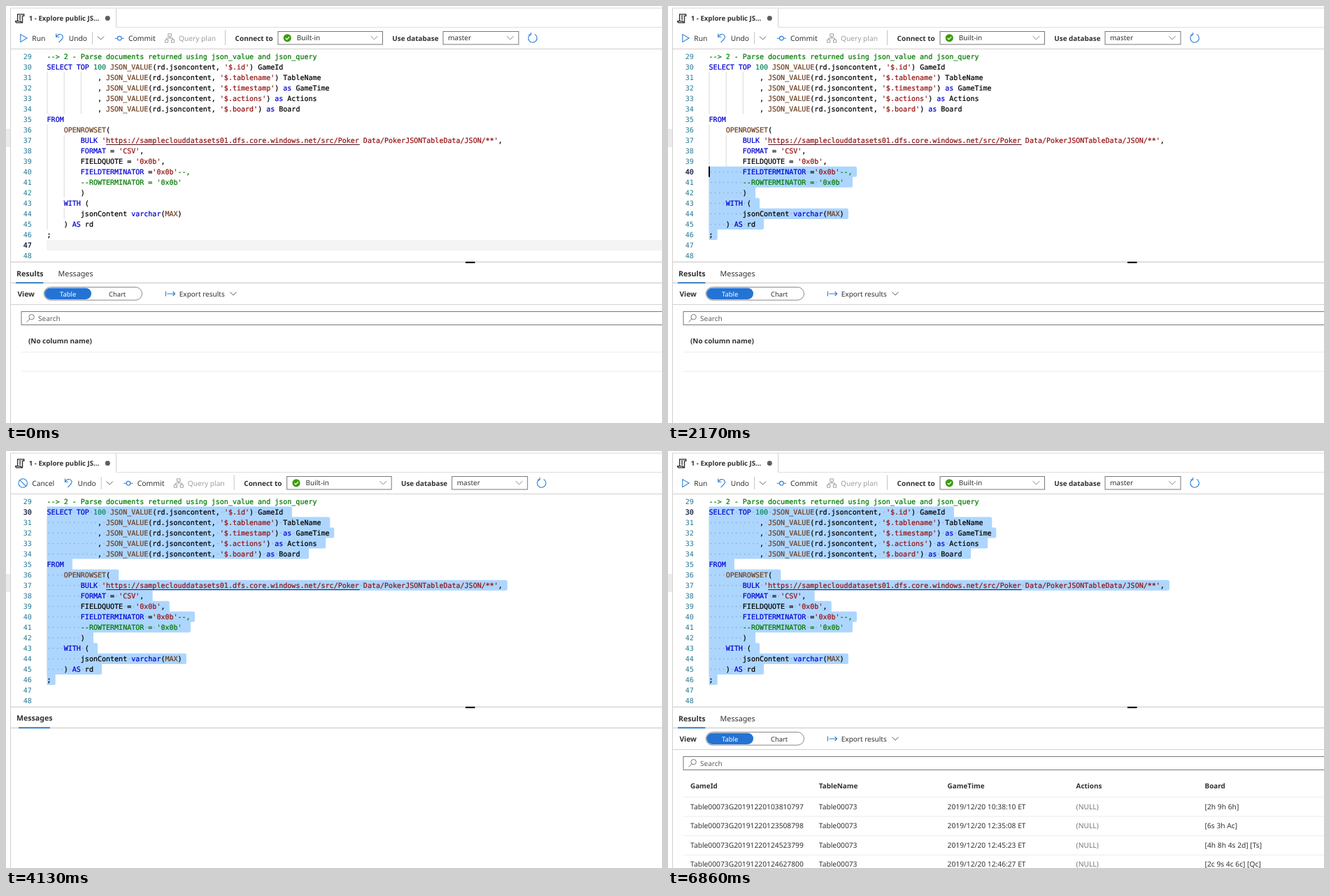
Recreate the animation shown at these times as an HTML page. Size 938 by 597 pixels, loop 7350 ms.

```html
<!DOCTYPE html>
<html lang="en">
<head>
<meta charset="utf-8">
<title>Query editor</title>
<style>
  html, body { margin: 0; width: 100%; height: 100%; overflow: hidden; background: #fff; }
  svg { display: block; width: 100%; height: 100%; }
  text { font: 10.2px "Noto Sans", "Open Sans", sans-serif; fill: #323130; text-rendering: geometricPrecision; }
  .b { font-weight: 600; }
  .code text { font: 10.03px "DejaVu Sans Mono", monospace; color: #000; }
  .code text, .code tspan { fill: currentColor; stroke: currentColor; stroke-width: .22; }
  .code .num { color: #237893; stroke: none; }
  .code .num.on { color: #0b1030; stroke: currentColor; }
  .code .dot { color: #333; stroke: none; opacity: .3; }
  .comment { color: #007a00; }
  .string { color: #941212; }
  .keyword { color: #0000d0; }
  .func { color: #6e3f22; }
  .number { color: #098658; }
  .line { fill: none; stroke-width: 1; }
  .blue { fill: none; stroke: #2b7cd3; stroke-width: 1.1; }
  .gray { fill: none; stroke: #7a7876; stroke-width: 1; }
</style>
</head>
<body>
<svg id="stage" viewBox="0 0 938 597" preserveAspectRatio="none"></svg>
<script>
const LOOP = 7350, STEP = 70;
const X = 58.6, CHAR = 6.04, ROW = 15.03, FIRST = 29;
const NBSP = '\u00a0';

const lines = [
  '--> 2 - Parse documents returned using json_value and json_query',
  "SELECT TOP 100 JSON_VALUE(rd.jsoncontent, '$.id') GameId ",
  "            , JSON_VALUE(rd.jsoncontent, '$.tablename') TableName ",
  "            , JSON_VALUE(rd.jsoncontent, '$.timestamp') as GameTime",
  "            , JSON_VALUE(rd.jsoncontent, '$.actions') as Actions ",
  "            , JSON_VALUE(rd.jsoncontent, '$.board') as Board ",
  'FROM ',
  '    OPENROWSET( ',
  "        BULK 'https://sampleclouddatasets01.dfs.core.windows.net/src/Poker Data/PokerJSONTableData/JSON/**',",
  "        FORMAT = 'CSV', ",
  "        FIELDQUOTE = '0x0b',",
  "        FIELDTERMINATOR ='0x0b'--,",
  "        --ROWTERMINATOR = '0x0b' ",
  '        ) ',
  '    WITH ( ',
  '        jsonContent varchar(MAX)',
  '    ) AS rd ',
  ';',
  '',
  ''
];

const tokens = /(--.*)|('[^']*')|\b(SELECT|TOP|FROM|BULK|FORMAT|FIELDTERMINATOR|WITH|AS|as|varchar)\b|\b(JSON_VALUE|OPENROWSET|MAX)\b|\b(\d+)\b/g;
const kinds = ['comment', 'string', 'keyword', 'func', 'number'];
const paint = s => s.replace(/ /g, NBSP).replace(tokens, (m, ...groups) =>
  `<tspan class="${kinds[groups.findIndex(g => g !== undefined)]}">${m}</tspan>`);
const spaceDots = s => s.trimEnd().replace(/[^ ]/g, NBSP).replace(/ /g, '·');

const rowTop = n => 64.4 + (n - FIRST) * ROW;
const text = (x, y, s, cls = '', size = 10.2, fill = '#323130') =>
  `<text x="${x}" y="${y}" class="${cls}" style="font-size:${size}px;fill:${fill}">${s}</text>`;
const line = (x1, y1, x2, y2, color) =>
  `<path class="line" d="M${x1} ${y1}L${x2} ${y2}" stroke="${color}"/>`;
const chevron = (x, y, r = 4.5, color = '#605e5c') =>
  `<path class="line" d="M${x - r} ${y - r / 2}l${r} ${r}l${r} ${-r}" stroke="${color}"/>`;
const combo = (x, w, label, lx) =>
  `<rect class="gray" x="${x}" y="36.5" width="${w}" height="18.5"/>` +
  text(lx, 49.3, label, '', 10) + chevron(x + w - 12, 45.5, 4.8, '#8a8886');

function codeView() {
  let guides = '', body = '';
  lines.forEach((s, i) => {
    const n = FIRST + i, y = rowTop(n), base = y + 11.1;
    const indent = s.search(/\S|$/);
    for (let c = 0; c < indent; c += 4)
      guides += line(X + c * CHAR + .4, y, X + c * CHAR + .4, y + ROW, '#d8d8d8');
    body += `<text class="num" id="num${n}" x="24.8" y="${base}">${n}</text>` +
      `<text x="${X}" y="${base}">${paint(s)}</text>` +
      `<text class="dot" id="dot${n}" x="${X}" y="${base}">${spaceDots(s)}</text>`;
  });
  const folds = [30, 35, 36, 43].map(n => chevron(48.7, rowTop(n) + 7.6, 3.6, '#888')).join('');
  return `<g class="code">
    <rect id="current" x="58" width="880" height="15" fill="#f4f4f4"/>
    ${guides}<path id="selection" fill="#add6ff"/>
    ${body}<g id="folds">${folds}</g>
    ${line(143.2, 198.5, 505.8, 198.5, '#4a1420')}
    <rect id="caret" width="2" height="15"/>
  </g>`;
}

const toolbar = `
  <g id="run">
    <rect id="hover" x="11" y="31" width="52" height="30" fill="#f3f2f1"/>
    <path class="blue" d="M20.8 40.6L30 46L20.8 51.6Z"/>${text(37.3, 50, 'Run')}
  </g>
  <g id="cancel">
    <circle class="blue" cx="24.2" cy="46" r="6.3"/><path class="blue" d="M19.8 41.6l8.8 8.8"/>
    ${text(37.3, 50, 'Cancel')}
  </g>
  <g id="tools">
    <path class="blue" d="M71.7 39.5v4.7h4.7M71.9 44C74 40.6 78 39.2 80.4 41.8C82.8 44.6 81 47 75.6 52"/>
    ${text(89.8, 50, 'Undo')}${line(123.5, 37, 123.5, 55, '#c8c6c4')}${chevron(135.5, 45.8)}
    <circle class="blue" cx="162.3" cy="46.2" r="2.8"/><path class="blue" d="M155.7 46.2h3.8M165.1 46.2h3.8"/>
    ${text(175, 50, 'Commit', '', 10.4)}
    <path class="line" stroke="#a19f9d" d="M231.8 39.8h4.6v4h-4.6zM227.6 48.2h4.2v4h-4.2zM236.5 48.2h4.2v4h-4.2zM234.1 43.8v2.2M229.7 48.2v-2.2h8.9v2.2"/>
    ${text(247, 50, 'Query plan', '', 10.2, '#a19f9d')}
    ${line(313.5, 34.5, 313.5, 56, '#c8c6c4')}
    ${text(327.6, 50, 'Connect to', 'b', 10)}
    ${combo(389, 149.5, 'Built-in', 415.8)}
    <circle cx="402.3" cy="45.8" r="5.6" fill="#3f9c10"/>
    <path d="M399.6 45.9l2 2l3.6-3.8" fill="none" stroke="#fff" stroke-width="1.3"/>
    ${text(552.3, 50, 'Use database', 'b', 9.9)}
    ${combo(625, 108, 'master', 632)}
    <path class="blue" d="M750 40.7A6.2 6.2 0 1 0 756 40.6M750.6 37.9v3.2h-3.2"/>
  </g>`;

const frame = `
  <rect y="176" width="6" height="26" fill="#ebebeb"/>
  ${line(6.5, 3, 6.5, 597, '#d2d0ce')}${line(6.5, 3, 938, 3, '#d8d6d4')}
  ${line(157.5, 4, 157.5, 30.5, '#d2d0ce')}${line(157.5, 30.5, 938, 30.5, '#e1dfdd')}
  ${line(7, 61.5, 938, 61.5, '#d2d0ce')}
  <path d="M16.5 21V11.8H25.8V14.2H23.6V23.8H15.2Q13.6 23.8 13.6 21.6H21.4Q21.4 23.8 23.2 23.8M18.6 14.3h3M18.6 16.5h3M18.6 18.7h3" fill="none" stroke="#222" stroke-width="1.2"/>
  ${text(32.8, 21.2, '1 - Explore public JS...', 'b', 9.65)}
  <circle cx="145.3" cy="17.5" r="3.5" fill="#605e5c"/>
  ${line(7, 366.5, 938, 366.5, '#c8c6c4')}
  <rect x="657" y="366" width="13.5" height="2.2"/>
  ${line(7, 396.5, 938, 396.5, '#c8c6c4')}`;

const columns = [32, 215.8, 399.6, 583.6, 767.6];
const rows = [
  ['103810797', '10:38:10', '[2h 9h 6h]'],
  ['123508798', '12:35:08', '[6s 3h Ac]'],
  ['124523799', '12:45:23', '[4h 8h 4s 2d] [Ts]'],
  ['124627800', '12:46:27', '[2c 9s 4c 6c] [Qc]']
];
const tableRow = ([id, time, board], r) => {
  const cells = ['Table00073G20191220' + id, 'Table00073', `2019/12/20 ${time} ET`, '(NULL)', board];
  return cells.map((s, c) =>
    text(columns[c], 512.6 + r * 27.6, s, '', 10.25, c === 3 ? '#797775' : '#323130')).join('') +
    line(22, 523.1 + r * 27.6, 938, 523.1 + r * 27.6, '#edebe9');
};

const results = `
  <g id="results">
    ${text(15, 386.6, 'Results', 'b', 10.6)}${text(74.6, 386.6, 'Messages', '', 10.75)}
    ${text(16.4, 416.3, 'View', 'b', 10.3)}
    <rect x="54.3" y="402.5" width="140.2" height="18.6" rx="9.3" fill="#fff" stroke="#8a8886"/>
    <rect x="55.2" y="403.7" width="66.8" height="16.2" rx="8.1" fill="#2473d4"/>
    ${text(77, 416, 'Table', '', 9.4, '#fff')}${text(147, 416, 'Chart', '', 9.4)}
    <path class="blue" d="M228.4 408.5v7M230.3 412h11.2M238.6 409l3 3l-3 3"/>
    ${text(247.8, 416.2, 'Export results', '', 10)}${chevron(325, 411.8)}
    ${line(7, 427.5, 938, 427.5, '#d2d0ce')}
    <rect class="gray" x="22" y="437.5" width="930" height="19"/>
    <circle class="gray" cx="36.6" cy="445.2" r="3.7"/><path class="gray" d="M33.9 448l-4.3 4.3"/>
    ${text(46, 450.7, 'Search', '', 10, '#605e5c')}
    ${line(22, 495.5, 938, 495.5, '#f0eeec')}
    <g id="empty">${text(32, 483.3, '(No column name)', 'b', 9.9)}${line(22, 523.1, 938, 523.1, '#edebe9')}</g>
    <g id="table">
      ${['GameId', 'TableName', 'GameTime', 'Actions', 'Board'].map((s, c) => text(columns[c], 483.3, s, 'b', 9.9)).join('')}
      <g id="rows">${rows.map(tableRow).join('')}</g>
    </g>
  </g>
  <g id="messages">
    ${text(15, 385.6, 'Messages', 'b', 10.6)}
    <g id="log">
      ${text(21.6, 428.2, '4:28:06 PM', '', 9.35, '#000')}
      ${text(90.6, 428.2, 'Started executing query at Line 30', '', 9.35, '#000')}
      ${line(90.6, 430, 241.6, 430, '#000')}
    </g>
  </g>
  <rect id="underline" y="395.4" height="1.8" fill="#1f6fb8"/>`;

document.getElementById('stage').innerHTML = frame + codeView() + toolbar + results;

const el = id => document.getElementById(id);
const show = (id, on) => el(id).style.display = on ? '' : 'none';
const set = (id, attrs) => { for (const k in attrs) el(id).setAttribute(k, attrs[k]); };
const ramp = (t, start, length) => Math.min(1, Math.max(0, (t - start) / length));

const DRAG = 1890, RUN = 4060, DONE = 6370, LAST = 46;
const dragLines = [45, 44, 43, 42, 40, 39, 37, 36, 34, 32, 30];
const caretToggles = [840, 1330, 1610, 3150, 3640, 4130, 4270, 4760, 5250, 5740, 6370, 6860];

function selectionPath(from, col, newline) {
  const right = n => n < from || n > LAST ? 0 : X + (lines[n - FIRST].length + newline) * CHAR;
  let d = '';
  for (let n = from; n <= LAST; n++) {
    const left = X + (n === from ? col * CHAR : 0), r = right(n), y = rowTop(n);
    const a = right(n - 1) < r ? 2.5 : 0, b = right(n + 1) < r ? 2.5 : 0;
    d += `M${left} ${y}H${r - a}q${a} 0 ${a} ${a}V${y + ROW - b}q0 ${b} ${-b} ${b}H${left}Z`;
  }
  return d;
}

function render(time) {
  const t = Math.floor(time / STEP) * STEP;
  const step = Math.min(dragLines.length - 1, Math.floor((t - DRAG) / STEP));
  const selecting = step >= 0;
  const active = selecting ? dragLines[step] : t < 1610 ? 47 : LAST;
  const col = selecting ? +(step === 0) : +(t >= 1610);

  lines.forEach((_, i) => {
    const n = FIRST + i;
    el('num' + n).classList.toggle('on', n === active);
    show('dot' + n, selecting && n >= active && n <= LAST);
  });
  show('current', !selecting);
  set('current', { y: rowTop(active) });
  set('selection', { d: selecting ? selectionPath(active, col, +(step > 0)) : '' });
  set('caret', { x: X + col * CHAR - .6, y: rowTop(active) });
  show('caret', caretToggles.filter(at => at <= t).length % 2);
  set('folds', { opacity: ramp(t, 2450, 420) * (1 - ramp(t, 3710, 350)) });

  const running = t >= RUN && t < DONE, done = t >= DONE;
  show('hover', t >= 3780 && t < RUN);
  show('run', !running);
  show('cancel', running);
  set('tools', { transform: `translate(${running ? 12.7 : 0} 0)` });
  show('results', !running);
  show('messages', running);
  show('log', t >= 4200);
  show('empty', !done);
  show('table', done);
  set('rows', { opacity: ramp(t, 6321, 367) });

  const inset = running ? 6 * (1 - ramp(t, RUN, 210)) : done ? 6 * (1 - ramp(t, DONE, 210)) : 0;
  set('underline', { x: 14 + inset, width: (running ? 53 : 39.3) - 2 * inset });
}

const start = performance.now();
function tick() {
  render((performance.now() - start) % LOOP);
  requestAnimationFrame(tick);
}
tick();
</script>
</body>
</html>
```
